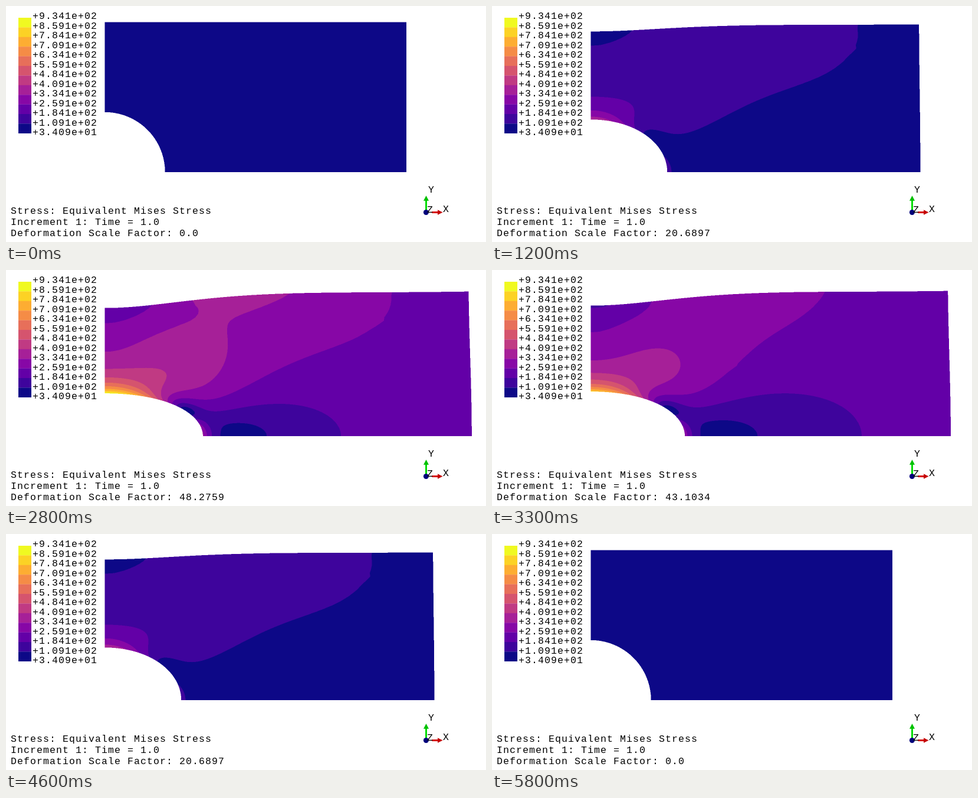
An HTML page with a canvas for the animation above (5900 ms loop, 814 px wide and 402 px high).

```html
<!DOCTYPE html>
<html>
<head>
<meta charset="utf-8">
<title>Plate with a hole</title>
<style>
  html, body { margin: 0; width: 100%; height: 100%; overflow: hidden; background: #fff; }
  canvas, svg { position: absolute; left: 0; top: 0; width: 814px; height: 402px; display: block; }
  text { font: 16.5px "Liberation Mono", "Courier New", monospace; letter-spacing: 1.1px; fill: #000; white-space: pre; }
</style>
</head>
<body>
<canvas id="plate" width="1628" height="804"></canvas>
<svg viewBox="0 0 814 402">
  <g id="legend"></g>
  <text x="8" y="354">Stress: Equivalent Mises Stress</text>
  <text x="8" y="373">Increment 1: Time = 1.0</text>
  <text x="8" y="392" id="scale"></text>
  <path d="M712.5 349V331" stroke="#00dc00" stroke-width="3"/>
  <path d="M712.5 323L717 331.8H708Z" fill="#00c000"/>
  <path d="M722 351.5H733" stroke="#d80000" stroke-width="3"/>
  <path d="M740.5 351.5L732 347.3V355.7Z" fill="#c40000"/>
  <circle cx="712.4" cy="351.5" r="4.5" fill="#00007c"/>
  <text x="716" y="318">Y</text>
  <text x="741" y="351">X</text>
  <text x="714" y="352">Z</text>
</svg>
<script>
const COLORS = ['#0d0887', '#3e049c', '#6300a7', '#8707a6', '#a62098', '#c03a83',
  '#d5546e', '#e76f5a', '#f58c46', '#fdad32', '#fcd225', '#f0f921'];
const LOW = 34.09, BAND = 75;
const LOAD = 250, YOUNG = 70000, NU = 0.3;
const STEPS = 29, MAX_SCALE = 50, STEP_MS = 100;
const UNIT = 102.3, ORIGIN_X = 167.4, ORIGIN_Y = 283.1, SS = 2;

// Quarter plate, 5 x 2.5 hole radii: j runs along the arc, i from the hole outwards.
const NA = 56, NB = 60, SPLIT = 26, GRADE = 2.5;
const ROW = NA + 1, COUNT = ROW * (NB + 1);
const X = new Float64Array(COUNT), Y = new Float64Array(COUNT);
for (let i = 0; i <= NB; i++) {
  const g = Math.expm1(GRADE * i / NB) / Math.expm1(GRADE);
  for (let j = 0; j <= NA; j++) {
    const right = j <= SPLIT;
    const p = right ? j / SPLIT : (j - SPLIT) / (NA - SPLIT);
    const angle = Math.PI / 4 * (right ? p : 1 + p);
    const outX = right ? 5 : 5 * (1 - p), outY = right ? 2.5 * p : 2.5;
    const n = i * ROW + j;
    X[n] = Math.cos(angle) * (1 - g) + outX * g;
    Y[n] = Math.sin(angle) * (1 - g) + outY * g;
  }
}
const cells = [];
for (let i = 0; i < NB; i++) {
  for (let j = 0; j < NA; j++) {
    const n = i * ROW + j;
    cells.push([n, n + 1, n + ROW + 1, n + ROW]);
  }
}

const CORNERS = [[-1, -1], [1, -1], [1, 1], [-1, 1]];
const STIFF = 1 / (1 - NU * NU), SHEAR = (1 - NU) / 2;

// Shape function gradients of a bilinear cell at local point (s, t).
function gradients(cell, s, t) {
  const ds = CORNERS.map(([a, b]) => a * (1 + t * b) / 4);
  const dt = CORNERS.map(([a, b]) => b * (1 + s * a) / 4);
  const dot = (d, v) => d.reduce((sum, w, k) => sum + w * v[cell[k]], 0);
  const xs = dot(ds, X), ys = dot(ds, Y), xt = dot(dt, X), yt = dot(dt, Y);
  const det = xs * yt - xt * ys;
  return {
    area: Math.abs(det),
    dx: ds.map((d, k) => (d * yt - dt[k] * ys) / det),
    dy: ds.map((d, k) => (dt[k] * xs - d * xt) / det)
  };
}

// Plane stress displacements for unit tension and unit modulus (banded Cholesky).
function solve() {
  const size = 2 * COUNT, width = 2 * (NA + 2) + 2, m = width - 1;
  const K = new Float64Array(size * width), f = new Float64Array(size);
  const at = (r, c) => r * m + c + m;
  const add = (r, c, v) => { if (c <= r) K[at(r, c)] += v; };
  const q = 1 / Math.sqrt(3);
  for (const cell of cells) {
    for (const [a, b] of CORNERS) {
      const { area, dx, dy } = gradients(cell, a * q, b * q);
      const w = area * STIFF;
      for (let k = 0; k < 4; k++) {
        for (let l = 0; l < 4; l++) {
          const r = 2 * cell[k], c = 2 * cell[l];
          add(r, c, w * (dx[k] * dx[l] + SHEAR * dy[k] * dy[l]));
          add(r, c + 1, w * (NU * dx[k] * dy[l] + SHEAR * dy[k] * dx[l]));
          add(r + 1, c, w * (NU * dy[k] * dx[l] + SHEAR * dx[k] * dy[l]));
          add(r + 1, c + 1, w * (dy[k] * dy[l] + SHEAR * dx[k] * dx[l]));
        }
      }
    }
  }
  // Symmetry planes, then tension on the right edge.
  for (let i = 0; i <= NB; i++) {
    const v = 2 * i * ROW + 1, u = 2 * (i * ROW + NA);
    K[at(v, v)] += 1e8;
    K[at(u, u)] += 1e8;
  }
  for (let j = 0; j < SPLIT; j++) {
    const n = NB * ROW + j, half = (Y[n + 1] - Y[n]) / 2;
    f[2 * n] += half;
    f[2 * n + 2] += half;
  }
  for (let r = 0; r < size; r++) {
    const first = Math.max(0, r - m), baseR = r * m + m;
    for (let c = first; c <= r; c++) {
      const baseC = c * m + m;
      let sum = K[baseR + c];
      for (let k = first; k < c; k++) sum -= K[baseR + k] * K[baseC + k];
      K[baseR + c] = c === r ? Math.sqrt(sum) : sum / K[baseC + c];
    }
  }
  for (let r = 0; r < size; r++) {
    for (let k = Math.max(0, r - m); k < r; k++) f[r] -= K[at(r, k)] * f[k];
    f[r] /= K[at(r, r)];
  }
  for (let r = size - 1; r >= 0; r--) {
    f[r] /= K[at(r, r)];
    for (let k = Math.max(0, r - m); k < r; k++) f[k] -= K[at(r, k)] * f[r];
  }
  return f;
}

// Mises stress from nodal averages of the stress components.
function misesStress(disp) {
  const sx = new Float64Array(COUNT), sy = new Float64Array(COUNT);
  const sxy = new Float64Array(COUNT), hits = new Float64Array(COUNT);
  for (const cell of cells) {
    CORNERS.forEach(([s, t], corner) => {
      const { dx, dy } = gradients(cell, s, t);
      let ex = 0, ey = 0, gxy = 0;
      for (let k = 0; k < 4; k++) {
        const u = disp[2 * cell[k]], v = disp[2 * cell[k] + 1];
        ex += dx[k] * u;
        ey += dy[k] * v;
        gxy += dy[k] * u + dx[k] * v;
      }
      const n = cell[corner];
      sx[n] += STIFF * (ex + NU * ey);
      sy[n] += STIFF * (ey + NU * ex);
      sxy[n] += STIFF * SHEAR * gxy;
      hits[n]++;
    });
  }
  return sx.map((_, n) => {
    const a = sx[n] / hits[n], b = sy[n] / hits[n], c = sxy[n] / hits[n];
    return LOAD * Math.sqrt(a * a - a * b + b * b + 3 * c * c);
  });
}

const disp = solve();
const mises = misesStress(disp);

const canvas = document.getElementById('plate');
const ctx = canvas.getContext('2d');
const W = canvas.width, H = canvas.height;
const image = ctx.createImageData(W, H);
const pixels = new Uint32Array(image.data.buffer);
const packed = COLORS.map(c => {
  const v = parseInt(c.slice(1), 16);
  return (0xff000000 | (v & 255) << 16 | (v & 0xff00) | v >> 16) >>> 0;
});
const px = new Float64Array(COUNT), py = new Float64Array(COUNT);

function fillTriangle(a, b, c, load) {
  const ax = px[a], ay = py[a], bx = px[b], by = py[b], cx = px[c], cy = py[c];
  const det = (bx - ax) * (cy - ay) - (cx - ax) * (by - ay);
  if (!det) return;
  const x0 = Math.max(0, Math.floor(Math.min(ax, bx, cx))), x1 = Math.min(W - 1, Math.ceil(Math.max(ax, bx, cx)));
  const y0 = Math.max(0, Math.floor(Math.min(ay, by, cy))), y1 = Math.min(H - 1, Math.ceil(Math.max(ay, by, cy)));
  const eps = -1e-9;
  for (let y = y0; y <= y1; y++) {
    const dy = y + 0.5 - ay;
    for (let x = x0; x <= x1; x++) {
      const dx = x + 0.5 - ax;
      const wb = (dx * (cy - ay) - (cx - ax) * dy) / det;
      const wc = ((bx - ax) * dy - dx * (by - ay)) / det;
      const wa = 1 - wb - wc;
      if (wa < eps || wb < eps || wc < eps) continue;
      const stress = load * (wa * mises[a] + wb * mises[b] + wc * mises[c]);
      const band = Math.floor((stress - LOW) / BAND);
      pixels[y * W + x] = packed[Math.max(0, Math.min(COLORS.length - 1, band))];
    }
  }
}

const scaleText = document.getElementById('scale');

function draw(step) {
  const load = (STEPS - Math.abs(STEPS - step)) / STEPS;
  const scale = load * MAX_SCALE, stretch = scale * LOAD / YOUNG;
  for (let n = 0; n < COUNT; n++) {
    px[n] = SS * (ORIGIN_X + UNIT * (X[n] + stretch * disp[2 * n]));
    py[n] = SS * (ORIGIN_Y - UNIT * (Y[n] + stretch * disp[2 * n + 1]));
  }
  pixels.fill(0xffffffff);
  for (const [a, b, c, d] of cells) {
    fillTriangle(a, b, c, load);
    fillTriangle(a, c, d, load);
  }
  ctx.putImageData(image, 0, 0);
  const value = String(+scale.toFixed(4));
  scaleText.textContent = 'Deformation Scale Factor: ' + (value.includes('.') ? value : value + '.0');
}

function label(value) {
  const [mantissa, power] = value.toExponential(3).split('e+');
  return `+${mantissa}e+${power.padStart(2, '0')}`;
}

const top12 = COLORS.length;
let legend = '';
for (let k = 0; k <= top12; k++) {
  if (k < top12) {
    legend += `<rect x="21" y="${20 + 16.4 * k}" width="22" height="16.6" fill="${COLORS[top12 - 1 - k]}"/>`;
  }
  legend += `<text x="45" y="${22 + 16.5 * k}">${label(LOW + BAND * (top12 - k))}</text>`;
}
document.getElementById('legend').innerHTML = legend;

let shown = 0;
draw(0);
const start = performance.now();
function tick() {
  const step = Math.floor((performance.now() - start) / STEP_MS) % (2 * STEPS + 1);
  if (step !== shown) draw(shown = step);
  requestAnimationFrame(tick);
}
requestAnimationFrame(tick);
</script>
</body>
</html>
```
